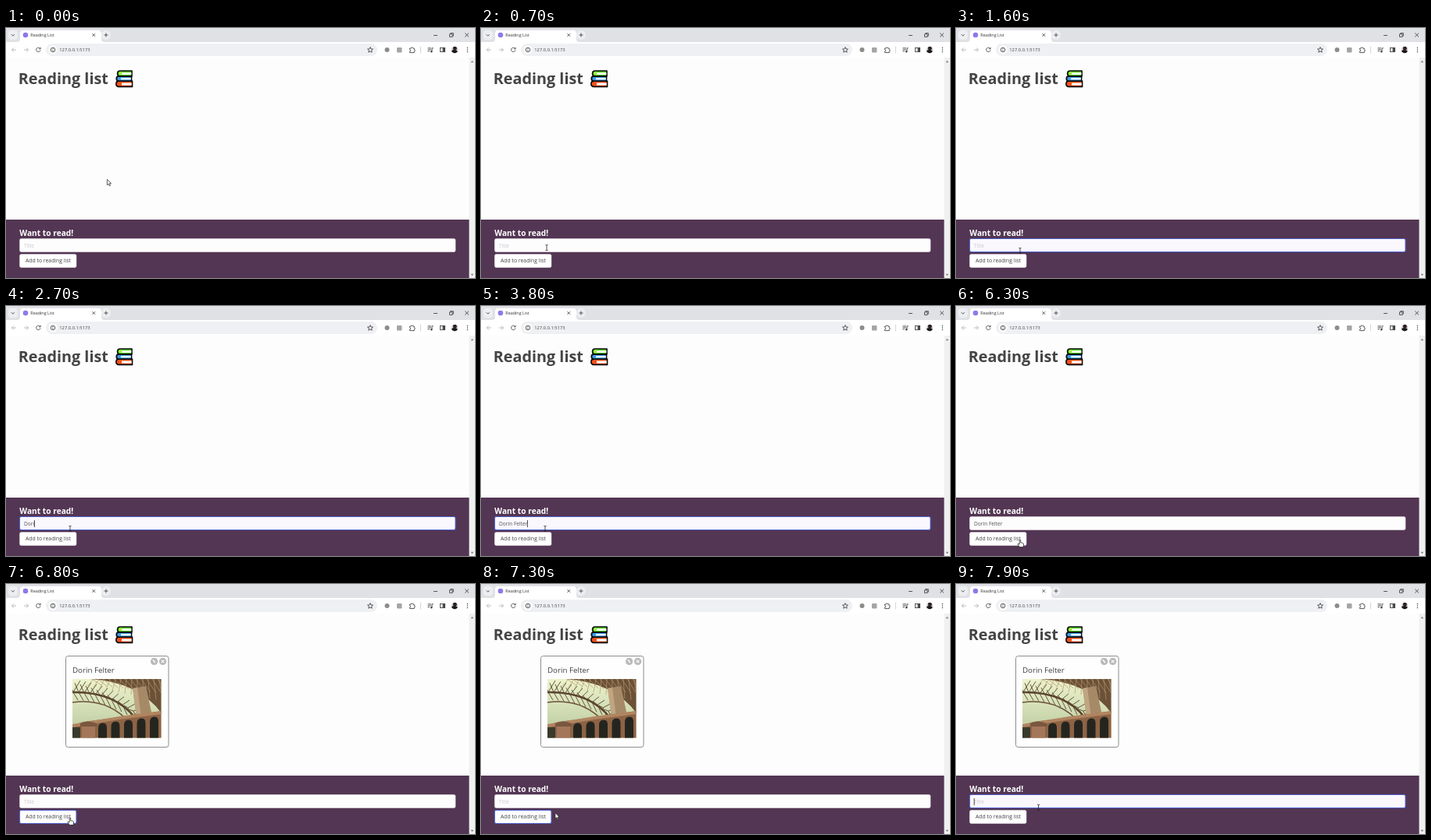
Animation of 600x321 px, one loop 8000 ms. Source, as an HTML page:

```html
<!DOCTYPE html>
<html lang="en">
<head>
<meta charset="utf-8">
<title>Reading List</title>
<style>
html, body { margin: 0; width: 100%; height: 100%; overflow: hidden; background: #fdfdfd; }
svg { display: block; width: 100vw; height: 100vh; }
text { font-family: "Open Sans", "Noto Sans", sans-serif; white-space: pre; }
.line { fill: none; stroke: #474747; stroke-width: .9; }
.pale { stroke: #b4b4b4; }
.bold { font-weight: 700; }
</style>
</head>
<body>
<svg viewBox="0 0 600 321" xmlns="http://www.w3.org/2000/svg">
  <defs>
    <linearGradient id="sky" x2="0" y2="1">
      <stop offset="0" stop-color="#edf3cc"/><stop offset="1" stop-color="#b7c79c"/>
    </linearGradient>
    <clipPath id="frame"><rect x="85" y="122" width="113.5" height="75.5"/></clipPath>
    <clipPath id="face"><circle cx="574" cy="28" r="4.3"/></clipPath>
  </defs>

  <!-- browser: tabs -->
  <rect width="600" height="20" fill="#dfe1e5"/>
  <rect x="3" y="3" width="12" height="12" rx="4" fill="#eceef1"/>
  <path class="line" d="M6.8 8.2l2 2 2-2"/>
  <path d="M14 18q4 0 4-4V7q0-4 4-4h96q4 0 4 4v7q0 4 4 4z" fill="#fff"/>
  <circle cx="25" cy="9" r="3.3" fill="#8f78ea"/>
  <text x="31.3" y="11" font-size="5.4" fill="#303030">Reading List</text>
  <path class="line" d="M110.5 7.2l3.6 3.6m0-3.6l-3.6 3.6"/>
  <circle cx="128" cy="9" r="6" fill="#eceef1"/>
  <path class="line" d="M125.5 9h5m-2.5-2.5v5"/>
  <path class="line" d="M547 9.5h5M567.5 7.8h3.6v3.6h-3.6zM568.7 7.6v-1h3.6v3.6h-1M587.2 6.6l4.8 4.8m0-4.8l-4.8 4.8"/>

  <!-- browser: toolbar -->
  <rect y="18" width="600" height="20" fill="#fff"/>
  <path class="line pale" d="M13 28H7.4m2.6-2.6L7.4 28l2.6 2.6M23 28h5.6m-2.6-2.6l2.6 2.6-2.6 2.6"/>
  <path class="line" d="M43.6 26.4a2.7 2.7 0 1 0 .4 2M44.2 24.8v2h-2"/>
  <rect x="51" y="20" width="424" height="16" rx="8" fill="#eff0f3"/>
  <circle cx="60" cy="28" r="5.6" fill="#fff"/>
  <circle class="line" cx="60" cy="28" r="2.8"/>
  <path class="line" d="M60 27.6v2M60 26.2v.8"/>
  <text x="68.3" y="30.1" font-size="5.8" fill="#444">127.0.0.1:5173</text>
  <path class="line" d="M466 24.6l1 2.3 2.5.2-1.9 1.6.6 2.5-2.2-1.3-2.2 1.3.6-2.5-1.9-1.6 2.5-.2z"/>
  <circle cx="487.5" cy="28" r="3" fill="#8c8c8c"/>
  <rect x="500" y="25" width="6.5" height="6.5" rx="1" fill="#a5a5a5"/>
  <path class="line" d="M516.6 26h1.7a1.1 1.1 0 0 1 2.2 0h1.7v1.8a1.1 1.1 0 0 1 0 2.2v1.6h-5.6v-1.7a1.1 1.1 0 0 0 0-2.2z"/>
  <path class="line" d="M530.5 23.5v9" stroke="#c8cde0" style="stroke:#ccd2e4"/>
  <path class="line" d="M539.5 25.8h4.4M539.5 27.8h4.4M539.5 29.8h2.5M545 30.3v-4.5h1.8"/>
  <circle cx="544.2" cy="30.3" r="1.2" fill="#474747"/>
  <rect class="line" x="555.5" y="25.4" width="6" height="5.2"/>
  <rect x="558.6" y="25.2" width="3" height="5.6" fill="#474747"/>
  <g clip-path="url(#face)">
    <rect x="569" y="23" width="10" height="10" fill="#d7d0cd"/>
    <circle cx="574.3" cy="26" r="2.5" fill="#2b2426"/>
    <ellipse cx="573.6" cy="32" rx="4.8" ry="4" fill="#1c1a1d"/>
  </g>
  <g fill="#474747"><circle cx="590.4" cy="25.4" r=".75"/><circle cx="590.4" cy="28" r=".75"/><circle cx="590.4" cy="30.6" r=".75"/></g>

  <!-- page -->
  <rect y="38" width="600" height="283" fill="#fdfdfd"/>
  <rect x="592.5" y="38" width="7.5" height="283" fill="#f0f0f1"/>
  <path d="M594.6 44.2l1.8-2.4 1.8 2.4zM594.6 315.8l1.8 2.4 1.8-2.4z" fill="#808080"/>
  <text class="bold" x="15.8" y="71.6" font-size="19.8" fill="#444">Reading list</text>

  <!-- stack of books -->
  <g stroke="#0c0c0c" stroke-width="1.7" stroke-linejoin="round">
    <path d="M161.5 68.2h-17q-3.6 0-3.6 3.6t3.6 3.6h17z" fill="#f2511b"/>
    <path d="M160.5 61.8h-16q-3.2 0-3.2 3.2t3.2 3.2h16z" fill="#3c9be8"/>
    <path d="M161 55h-15q-3.4 0-3.4 3.4t3.4 3.4h15z" fill="#53d81c"/>
  </g>
  <path d="M148 57.2h12.4v2.7H148zM147 63.9h12.8v2.4H147zM148 70.4h12.7v3H148z" fill="#fff"/>
  <path d="M144.6 57l3-1v4.6l-3-1z" fill="#b9ef4b"/>

  <!-- result card -->
  <g id="card">
    <rect x="76.5" y="92.5" width="131.5" height="117" rx="3" fill="#fefefe" stroke="#8d8d8d"/>
    <circle cx="189.6" cy="99.4" r="4.6" fill="#b9b9b9"/>
    <circle cx="200.6" cy="99.4" r="4.6" fill="#b9b9b9"/>
    <path d="M188 97.3l2.8 3.8" stroke="#fff" stroke-width="1.5"/>
    <path d="M198.8 97.6l3.6 3.6m0-3.6l-3.6 3.6" stroke="#fff" stroke-width="1.1"/>
    <text id="name" x="85" y="114" font-size="9.75" fill="#3c3c3c"></text>
    <g clip-path="url(#frame)">
      <rect x="85" y="122" width="114" height="76" fill="url(#sky)"/>
      <path d="M108 122H199v44Q170 126 108 122z" fill="#6b5137"/>
      <path d="M85 139Q140 138 166 173" fill="none" stroke="#5b442e" stroke-width="2.6"/>
      <path d="M85 152Q130 146 158 178" fill="none" stroke="#6a5138" stroke-width="1.6"/>
      <path id="truss" fill="none" stroke="#59452f" stroke-width=".9"/>
      <path id="beams" fill="none" stroke="#b3976c" stroke-width=".7"/>
      <path d="M162 134l17-3 8 38h-20z" fill="#a68a68"/>
      <path d="M162 134l6-1 5 38h-6z" fill="#c0a582"/>
      <path d="M85 181l14-4 46-6 54-8v35H85z" fill="#8d6345"/>
      <path d="M85 180l60-10 54-7v4l-54 7-60 10z" fill="#b08560"/>
      <path d="M85 184h10v14H85z" fill="#39392c"/>
      <path d="M97 181h17v17H97z" fill="#a4775a"/>
      <path d="M95 179q10-5 21 0v4H95z" fill="#7a573f"/>
      <path id="arches" fill="#25251f"/>
    </g>
  </g>

  <!-- form -->
  <rect y="246" width="592.5" height="75" fill="#533653"/>
  <text class="bold" x="17.3" y="266.8" font-size="10.2" fill="#fff">Want to read!</text>
  <rect id="field" x="17.5" y="270.5" width="557.5" height="17" rx="2"/>
  <text id="hint" x="23" y="282" font-size="6.6" fill="#cdc7d0">Title</text>
  <text id="typed" x="23" y="282" font-size="6.6" fill="#505050"></text>
  <rect id="caret" y="275" width=".8" height="9" fill="#222"/>
  <rect id="button" x="17.5" y="290.5" width="72.5" height="17" rx="2" fill="#fff"/>
  <text x="25" y="301.4" font-size="6.85" fill="#444">Add to reading list</text>

  <!-- pointers, hot spot at 0,0 -->
  <g id="arrow"><path d="M0 0v7.4l1.7-1.5 1.2 2.6 1.2-.6-1.2-2.5h2.3z" fill="#fff" stroke="#222" stroke-width=".7"/></g>
  <g id="beam"><path d="M-1.6-3.6q1.6 0 1.6.8v5.6q0 .8-1.6.8M1.6-3.6q-1.6 0-1.6.8M0 2.8q0 .8 1.6.8" fill="none" stroke="#222" stroke-width=".8"/></g>
  <g id="hand"><path d="M-.8.2q.8-.9 1.5 0v3.3l3 .6q1 .3.9 1.4l-.5 3.7H-.6L-3 5.8q-.4-1 .6-1l1.6 1z" fill="#fff" stroke="#222" stroke-width=".75" stroke-linejoin="round"/></g>
</svg>
<script>
const LOOP = 8000, BLINK = 530;
const TITLE = 'Dorin Felter';
const TYPE_START = 2300, KEY_GAP = 130;
const FOCUS = 850, PRESS = 6100, ADDED = 6700, REFOCUS = 7550;
const TYPE_END = TYPE_START + KEY_GAP * (TITLE.length - 1);

// pointer moves: start, end, target x, target y
const HOME = [129.4, 194.3];
const MOVES = [
  [150, 780, 82, 286],
  [5100, 5500, 82, 300.3],
  [6900, 7200, 95, 293.8],
  [7340, 7520, 105.5, 286.8]
];

const $ = id => document.getElementById(id);
const show = (id, on) => $(id).setAttribute('visibility', on ? 'visible' : 'hidden');
const clamp = v => Math.max(0, Math.min(1, v));
const ease = v => v * v * (3 - 2 * v);
const inside = (x, y, l, t, r, b) => x >= l && x <= r && y >= t && y <= b;

function drawPhoto() {
  let truss = '', beams = '', arches = '';
  for (let i = 0; i < 13; i++) {
    const x = 86 + i * 7, y = 139 + i * i * .2;
    truss += `M${x} ${y}l9 ${-15 + i}M${x} ${y}l-5 ${-13 + i}M${x} ${y}l6 ${10 + i * .3}`;
    beams += `M${112 + i * 7} 122l${-8 + i} ${9 + i * 1.6}M${110 + i * 7} 122l12 ${8 + i}`;
  }
  for (let i = 0; i < 5; i++) {
    const x = 118 + i * 16.5, y = 185 - i * 2;
    arches += `M${x} 198V${y}q0-6 5.5-6.5t5.5 6V198z`;
  }
  $('truss').setAttribute('d', truss);
  $('beams').setAttribute('d', beams);
  $('arches').setAttribute('d', arches);
}

function pointerAt(t) {
  let [x, y] = HOME;
  for (const [from, to, tx, ty] of MOVES) {
    const k = ease(clamp((t - from) / (to - from)));
    x += (tx - x) * k;
    y += (ty - y) * k;
  }
  return [x, y];
}

function outline(id, on) {
  $(id).setAttribute('stroke', on ? '#4c5fc9' : '#e6e0e8');
  $(id).setAttribute('stroke-width', on ? 1.1 : .5);
}

function render(t) {
  const added = t >= ADDED;
  const focused = (t >= FOCUS && t < PRESS) || t >= REFOCUS;
  const keys = Math.floor((t - TYPE_START) / KEY_GAP) + 1;
  const count = added ? 0 : Math.max(0, Math.min(TITLE.length, keys));

  $('typed').textContent = TITLE.slice(0, count);
  show('hint', count === 0);
  show('card', added);
  outline('field', focused);
  $('field').setAttribute('fill', focused ? '#fbf8fd' : '#fefdfe');
  outline('button', added && !focused);

  // each key press restarts the blink
  let since = FOCUS;
  if (t >= REFOCUS) since = REFOCUS;
  else if (t >= TYPE_START) since = Math.min(TYPE_END, t);
  show('caret', focused && Math.floor((t - since) / BLINK) % 2 === 0);
  const width = count ? $('typed').getComputedTextLength() : 0;
  $('caret').setAttribute('x', 22.8 + width);

  const [x, y] = pointerAt(t);
  const kind = inside(x, y, 17, 270, 575, 288) ? 'beam'
    : inside(x, y, 17, 290, 90, 308) ? 'hand' : 'arrow';
  for (const id of ['arrow', 'beam', 'hand']) show(id, id === kind);
  $(kind).setAttribute('transform', `translate(${x} ${y})`);
}

$('name').textContent = TITLE;
drawPhoto();
render(0);
const begin = performance.now();
function tick() {
  render((performance.now() - begin) % LOOP);
  requestAnimationFrame(tick);
}
requestAnimationFrame(tick);
</script>
</body>
</html>
```
